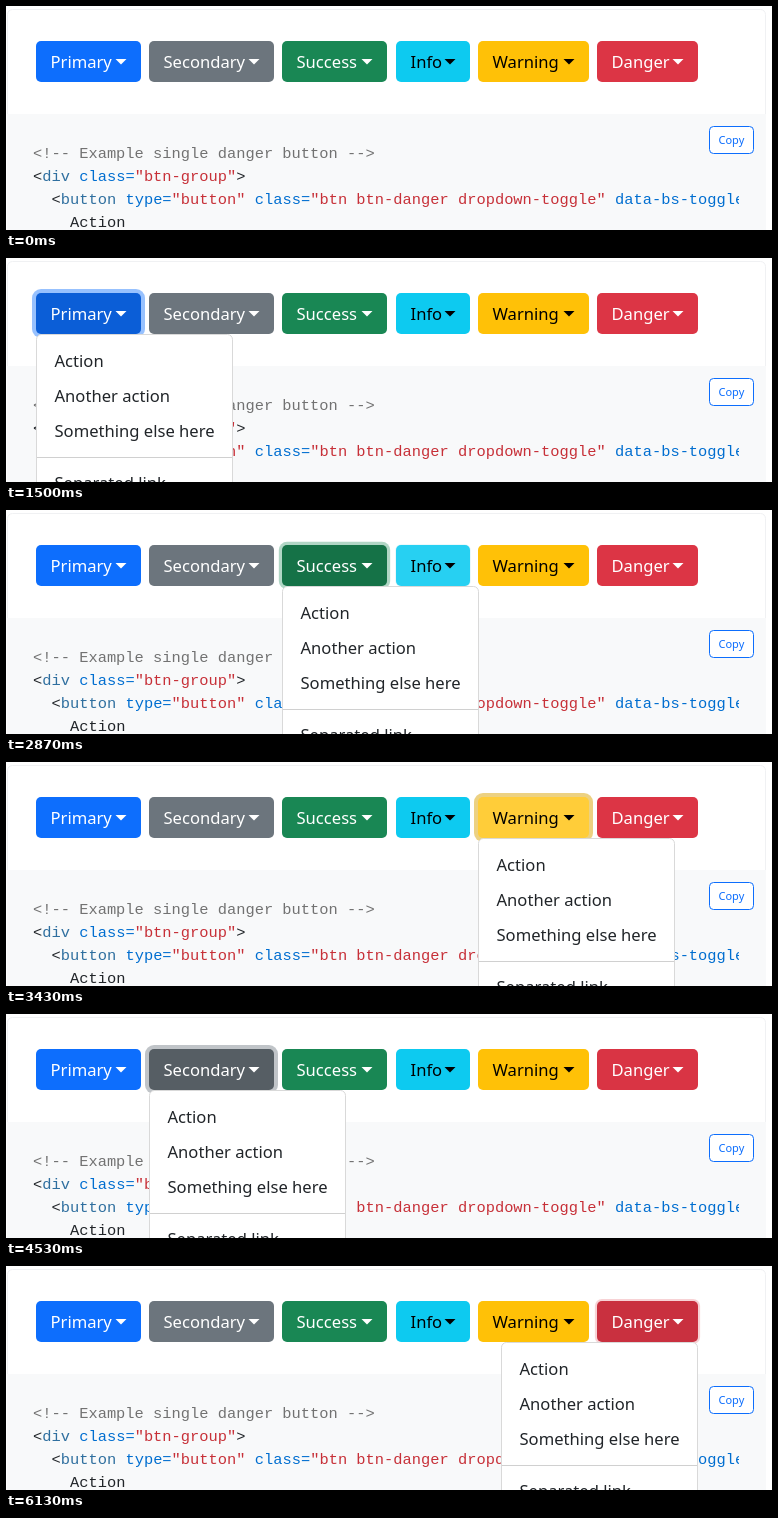
An HTML page that plays this animation: 766x224 px, repeating every 6160 ms.

```html
<!DOCTYPE html>
<html lang="en">
<head>
<meta charset="utf-8">
<title>Dropdown buttons</title>
<style>
  html, body { margin: 0; width: 100%; height: 100%; overflow: hidden; background: #fff; }
  svg { display: block; font: 16.6px "Noto Sans", sans-serif; fill: #212529; }
  .code { font: 15.4px "Liberation Mono", monospace; }
  .note { fill: #727272; }
  .tag { fill: #2f6f9f; }
  .attr { fill: #006ed0; }
  .str { fill: #c73038; }
</style>
</head>
<body>
<svg id="stage" width="766" height="224" viewBox="0 0 766 224">
  <clipPath id="codeBox"><rect width="733" height="224"/></clipPath>
  <rect x="1" y="108" width="759" height="116" fill="#f8f9fa"/>
  <path d="M1.5 108V8.5a5 5 0 0 1 5-5H754.5a5 5 0 0 1 5 5V108" fill="none" stroke="#f0f1f3"/>
  <g class="code" clip-path="url(#codeBox)">
    <text class="note" x="27" y="152">&lt;!-- Example single danger button --&gt;</text>
    <text x="27" y="175">&lt;<tspan class="tag">div</tspan> <tspan class="attr">class=</tspan><tspan class="str">"btn-group"</tspan>&gt;</text>
    <text x="45.5" y="198">&lt;<tspan class="tag">button</tspan> <tspan class="attr">type=</tspan><tspan class="str">"button"</tspan> <tspan class="attr">class=</tspan><tspan class="str">"btn btn-danger dropdown-toggle"</tspan> <tspan class="attr">data-bs-toggle=</tspan></text>
    <text x="64" y="221">Action</text>
  </g>
  <rect x="703.5" y="120.5" width="44" height="27" rx="4" fill="#fff" stroke="#0d6efd"/>
  <text x="712.5" y="138" font-size="11" fill="#0d6efd">Copy</text>
  <g id="buttons"></g>
  <g id="menu">
    <rect x=".5" y="76.5" width="196" height="160" rx="5" fill="#fff" stroke="#d9d9d9"/>
    <path d="M1 199.5H196" stroke="#d0d0d0"/>
    <text x="18.5" y="109">Action</text>
    <text x="18.5" y="144">Another action</text>
    <text x="18.5" y="179">Something else here</text>
    <text x="18.5" y="231">Separated link</text>
  </g>
</svg>
<script>
const LOOP = 6160, FADE = 150;

// label, left, width, colour, active colour, text colour
const BUTTONS = [
  ['Primary', 30, 105, '#0d6efd', '#0b5ed7', '#fff'],
  ['Secondary', 143, 125, '#6c757d', '#565e64', '#fff'],
  ['Success', 276, 105, '#198754', '#146c43', '#fff'],
  ['Info', 390, 74, '#0dcaf0', '#3dd5f3', '#000'],
  ['Warning', 472, 111, '#ffc107', '#ffcd39', '#000'],
  ['Danger', 591, 101, '#dc3545', '#b82c3a', '#fff']
];

// button index, then the times of hover, focus and opening
const VISITS = [
  [0, 700, 930, 1030],
  [1, 1550, 1660, 1760],
  [2, 2370, 2460, 2580],
  [3, 2790, 2840, 2930],
  [4, 3120, 3190, 3270],
  [1, 3780, 3840, 3930],
  [5, 4520, 4620, 4720],
  [-1, 6060, 6060, LOOP]
];

const clamp = v => Math.max(0, Math.min(1, v));
const mix = (a, share, b) => `color-mix(in srgb, ${a} ${share * 100}%, ${b})`;
const byId = id => document.getElementById(id);

byId('buttons').innerHTML = BUTTONS.map(([label, x, w, color, , ink]) => `
  <g>
    <rect style="fill: ${mix(color, .85, ink)}"/>
    <rect x="${x}" y="35" width="${w}" height="41" rx="5"/>
    <g fill="${ink}">
      <text x="${x + 14.5}" y="62">${label}</text>
      <path d="M${x + w - 25.5} 53h11l-5.5 5.5z"/>
    </g>
  </g>`).join('');
const groups = [...byId('buttons').children];

// Fade in from each visit's start and out from the next one's.
function level(index, phase, t) {
  return Math.max(0, ...VISITS.map((visit, k) => visit[0] !== index ? 0 :
    clamp((t - visit[phase]) / FADE) * (1 - clamp((t - VISITS[k + 1][phase]) / FADE))));
}

function draw(t) {
  BUTTONS.forEach(([, x, w, color, active], i) => {
    const focus = level(i, 2, t), lit = Math.max(focus, level(i, 1, t));
    const [ring, face] = groups[i].children;
    const grow = 4 * focus;
    const box = { x: x - grow, y: 35 - grow, width: w + 2 * grow, height: 41 + 2 * grow, rx: 5 + grow };
    for (const key in box) ring.setAttribute(key, box[key]);
    ring.setAttribute('opacity', .5 * focus);
    face.style.fill = mix(active, lit, color);
  });
  const current = VISITS.filter(visit => t >= visit[3]).pop();
  const menu = byId('menu');
  menu.style.display = current ? '' : 'none';
  if (current) menu.setAttribute('transform', `translate(${Math.min(BUTTONS[current[0]][1], 495)} 0)`);
}

const start = performance.now();
function tick() {
  draw((performance.now() - start) % LOOP);
  requestAnimationFrame(tick);
}
tick();
</script>
</body>
</html>
```
